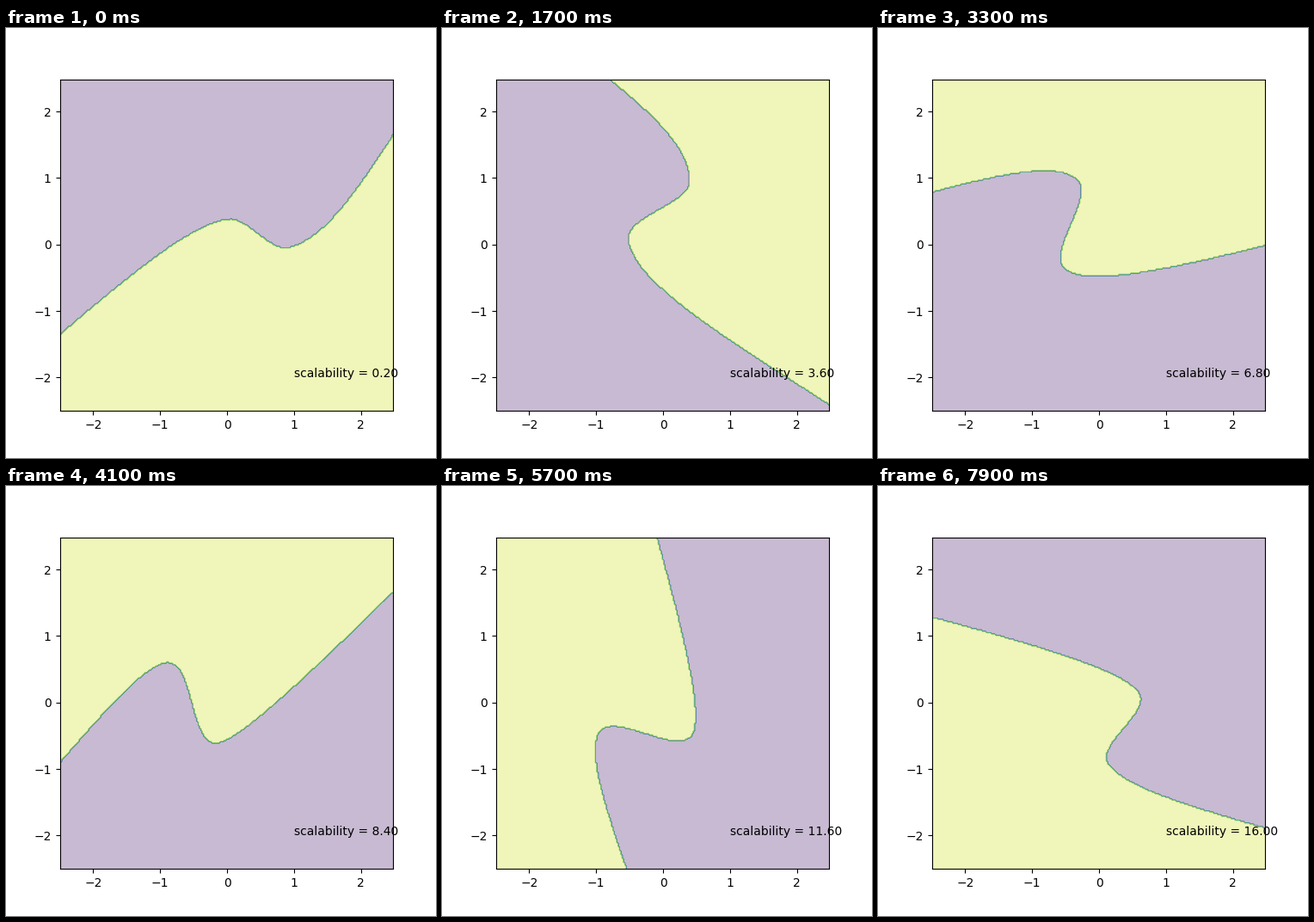
Recreate the animation shown at these times as a matplotlib script. Size 500x500 px, loop 8000 ms.

```python
import numpy as np
import matplotlib.pyplot as plt
from matplotlib.animation import FuncAnimation
from matplotlib.path import Path

FRAMES = 80
TURN = np.radians(3.6)   # rotation of the data per step

# step: roundness of the tails, then start, two bends and end of the boundary
POSES = {
    0: (1.65, -2.48 - 1.34j, 0.04 + 0.38j, 0.90 - 0.05j, 2.48 + 1.64j),
    9: (1.50, 1.25 - 2.50j, -0.51 + 0.11j, 0.61 + 1.03j, 0.01 + 2.48j),
    25: (1.90, 2.48 - 1.44j, -0.63 + 0.05j, 0.33 + 0.95j, -2.48 + 2.39j),
    41: (0.90, 2.48 + 1.66j, -0.19 - 0.61j, -0.86 + 0.60j, -2.48 - 0.88j),
    50: (1.50, 0.83 + 2.48j, 0.08 - 0.65j, -0.94 + 0.01j, -1.38 - 2.50j),
    65: (0.55, -1.33 + 2.48j, 0.65 - 0.16j, -0.68 - 0.91j, 0.39 - 2.50j),
    79: (1.15, -2.48 + 1.28j, 0.61 + 0.11j, 0.12 - 0.88j, 2.48 - 1.89j),
}
steps = list(POSES)
roundness = [pose[0] for pose in POSES.values()]
# key points turned back, so that only the change of shape is interpolated
keys = np.array([np.array(pose[1:]) * np.exp(-1j * TURN * step)
                 for step, pose in POSES.items()])


def unit(z):
    return z / abs(z)


def hermite(p, q, mp, mq, n=32):
    u = np.linspace(0, 1, n)
    return ((2 * u**3 - 3 * u**2 + 1) * p + (u**3 - 2 * u**2 + u) * mp
            + (3 * u**2 - 2 * u**3) * q + (u**3 - u**2) * mq)


def boundary(i):
    """S-shaped curve: two tails that straighten outwards, joined by a neck."""
    spin = np.exp(1j * TURN * i)
    a, p, q, b = (spin * np.interp(i, steps, col) for col in keys.T)
    k = np.interp(i, steps, roundness)
    speed = 0.8 * abs(q - p)
    tp = unit(unit(p - a) + unit(q - p))
    tq = unit(unit(q - p) + unit(b - q))
    ma = 1.5 * (p - a) - 0.5 * k * tp
    mb = 1.5 * (b - q) - 0.5 * k * tq
    return np.concatenate([
        [a - 8 * unit(ma)],
        hermite(a, p, ma, k * tp),
        hermite(p, q, speed * tp, speed * tq),
        hermite(q, b, k * tq, mb),
        [b + 8 * unit(mb)],
    ])


axis = np.arange(-2.5, 2.5, 0.02)
xx, yy = np.meshgrid(axis, axis)
grid = np.column_stack([xx.ravel(), yy.ravel()])


def classify(i):
    """Class 0 lies to the left of the boundary, class 1 to the right."""
    c = boundary(i)
    sweep = np.angle(c[0] / c[-1]) % (2 * np.pi)
    arc = 12 * unit(c[-1]) * np.exp(1j * np.linspace(0, sweep, 16))
    ring = np.concatenate([c, arc])
    left = Path(np.column_stack([ring.real, ring.imag])).contains_points(grid)
    return np.where(left, 0.0, 1.0).reshape(xx.shape)


fig, ax = plt.subplots(figsize=(5, 5), dpi=100)
ax.set_xlim(axis[0], axis[-1])
ax.set_ylim(axis[0], axis[-1])
label = ax.text(1, -2, "")
regions = []


def draw(i):
    while regions:
        regions.pop().remove()
    regions.append(ax.contourf(xx, yy, classify(i), alpha=0.3))
    label.set_text(f"scalability = {0.2 * (i + 1):.2f}")
    return [label]


anim = FuncAnimation(fig, draw, frames=FRAMES, interval=100,
                     init_func=lambda: draw(0), repeat=True, repeat_delay=0)
plt.show()
```
